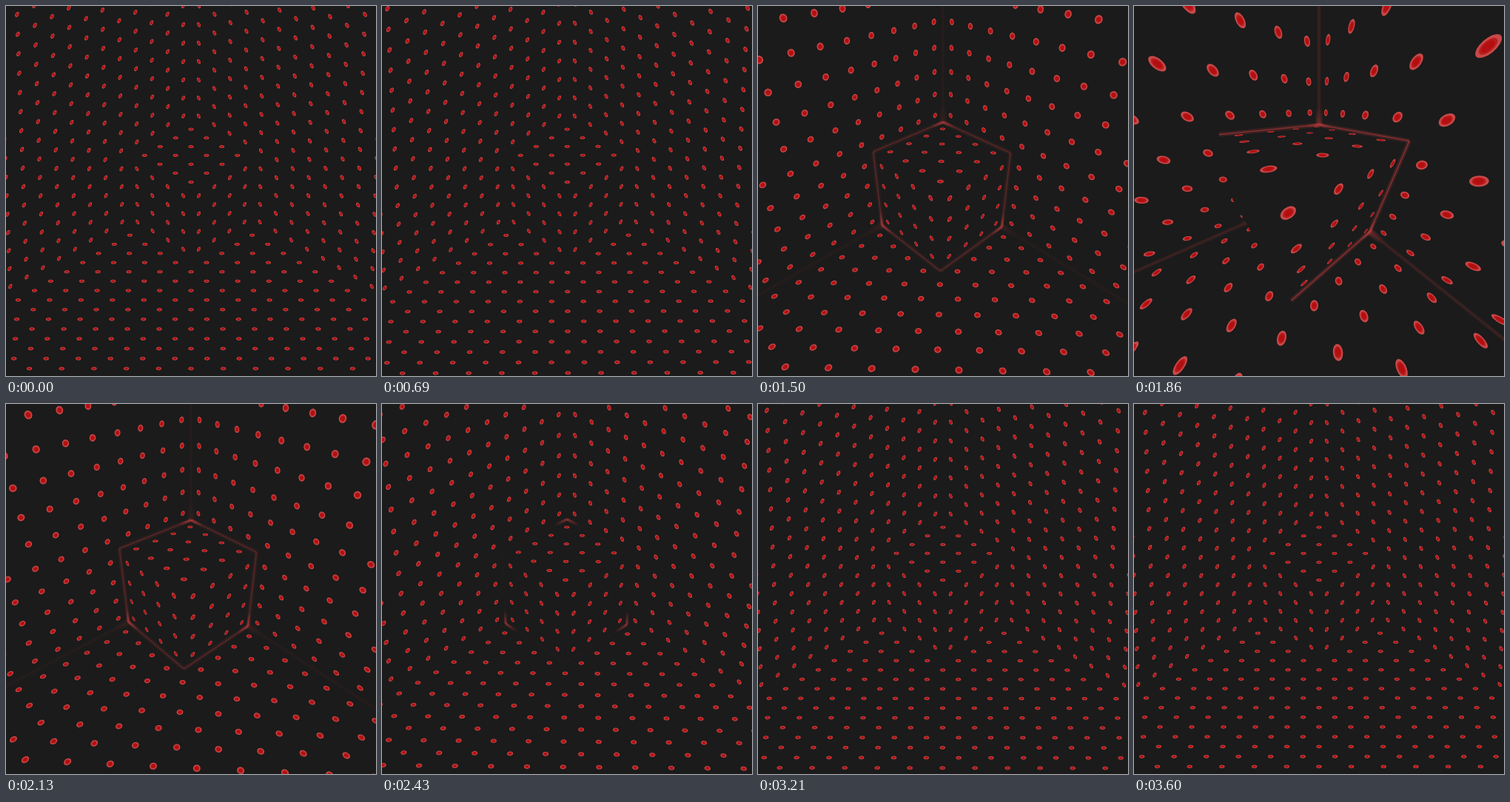
Write an HTML page with a canvas that moves like this. It is 500x500 px and loops after 3.63 s.

```html
<!DOCTYPE html>
<html>
<head>
<meta charset="utf-8">
<style>
html, body { margin: 0; overflow: hidden; background: #1b1b1b; }
canvas { display: block; }
</style>
</head>
<body>
<canvas id="stage" width="500" height="500"></canvas>
<script>
const ctx = document.getElementById('stage').getContext('2d');
const LOOP = 3630, STEP = 30, BG = '#1b1b1b';
const CUBE = 4, ROOM = 19, NEAR = 0.12;
const DOT_RINGS = [[0.12, '#c84848'], [0.085, '#b81c1e'], [0.06, '#b40e10']];
let cam;

const dot = (a, b) => a[0] * b[0] + a[1] * b[1] + a[2] * b[2];

// Axis 0 runs along the left wall, 1 along the right wall, 2 upwards.
function point(axis, height, a, b) {
  const p = [0, 0, 0];
  p[axis] = height;
  p[(axis + 1) % 3] = a;
  p[(axis + 2) % 3] = b;
  return p;
}

// Dolly zoom: the focal length follows the distance to the room corner.
function placeCamera(phase) {
  const far = Math.cos(Math.PI * phase) ** 2;
  const base = (7.58 + 145 * far ** 0.92) / Math.sqrt(3);
  const swing = Math.exp(-(((phase - 0.52) / 0.13) ** 2));
  const side = (0.94 * swing - 0.3 * Math.sin(2 * Math.PI * phase)) / Math.SQRT2;
  const lift = 0.19 / Math.sqrt(6);
  const pos = [base - side - lift, base + side - lift, base + 2 * lift];
  const dist = Math.hypot(...pos), flat = Math.hypot(pos[0], pos[1]);
  const back = pos.map(v => v / dist);
  const right = [-pos[1] / flat, pos[0] / flat, 0];
  const up = [-back[2] * pos[0] / flat, -back[2] * pos[1] / flat, flat / dist];
  cam = { pos, dist, back, right, up, focal: 29.17 * (dist - 2.64) };
}

const depth = p => cam.dist - dot(p, cam.back);

function project(p) {
  const k = cam.focal / depth(p);
  return [250 + k * dot(p, cam.right), 250 - k * dot(p, cam.up)];
}

function polygon(points) {
  points.forEach((p, i) => ctx[i ? 'lineTo' : 'moveTo'](...project(p)));
  ctx.closePath();
}

function drawDots(axis, height, count, skip) {
  const centers = [];
  for (let i = 0; i < count; i++)
    for (let j = 0; j < count; j++) {
      if (i < skip && j < skip) continue;
      const a = i + 0.5, b = j + 0.5, p = point(axis, height, a, b);
      if (depth(p) < 2 * NEAR) continue;
      const [x, y] = project(p);
      if (x > -60 && x < 560 && y > -60 && y < 560) centers.push([a, b]);
    }
  for (const [radius, color] of DOT_RINGS) {
    ctx.beginPath();
    for (const [a, b] of centers)
      polygon(Array.from({ length: 18 }, (_, n) => {
        const t = n * Math.PI / 9;
        return point(axis, height, a + radius * Math.cos(t), b + radius * Math.sin(t));
      }));
    ctx.fillStyle = color;
    ctx.fill();
  }
}

function line(p, q, width, style) {
  ctx.beginPath();
  ctx.moveTo(...project(p));
  ctx.lineTo(...project(q));
  ctx.lineWidth = width;
  ctx.strokeStyle = style;
  ctx.stroke();
}

const red = alpha => `rgba(200,62,62,${alpha})`;

function halo(p, radius, alpha) {
  const [x, y] = project(p);
  const gradient = ctx.createRadialGradient(x, y, 0, x, y, radius);
  gradient.addColorStop(0, red(alpha));
  gradient.addColorStop(1, red(0));
  return gradient;
}

function drawRoom(glow) {
  for (let axis = 0; axis < 3; axis++) {
    drawDots(axis, 0, ROOM, CUBE);
    const reach = Math.min(30, (cam.dist - 0.3) / cam.back[axis]);
    const start = point(axis, CUBE, 0, 0), end = point(axis, reach, 0, 0);
    line(start, end, 5, red(0.22 * glow ** 5));
    line(start, end, 1.5, red(0.2 * glow ** 5));
    line(start, end, 9, halo(start, 24, 0.6 * glow ** 5));
  }
}

function drawCube(glow) {
  const visible = [0, 1, 2].filter(axis => cam.pos[axis] > CUBE);
  for (const axis of visible) {
    ctx.beginPath();
    polygon([[0, 0], [CUBE, 0], [CUBE, CUBE], [0, CUBE]].map(c => point(axis, CUBE, ...c)));
    ctx.fillStyle = BG;
    ctx.fill();
    drawDots(axis, CUBE, CUBE, 0);
  }
  for (const axis of visible) {
    const corner = point(axis, CUBE, 0, 0);
    const shine = halo(corner, 18, Math.min(0.6, 2.2 * glow));
    for (const end of [point(axis, CUBE, CUBE, 0), point(axis, CUBE, 0, CUBE)]) {
      line(corner, end, 6, red(0.28 * glow ** 3));
      line(corner, end, 1.5, red(0.65 * glow ** 2));
      line(corner, end, 3.5, shine);
    }
  }
}

function frame(now) {
  const time = Math.floor(now % LOOP / STEP) * STEP;
  placeCamera(time / LOOP);
  const glow = Math.max(0, 1 - cam.dist / 65);
  ctx.fillStyle = BG;
  ctx.fillRect(0, 0, 500, 500);
  drawRoom(glow);
  drawCube(glow);
  requestAnimationFrame(frame);
}
requestAnimationFrame(frame);
</script>
</body>
</html>
```
